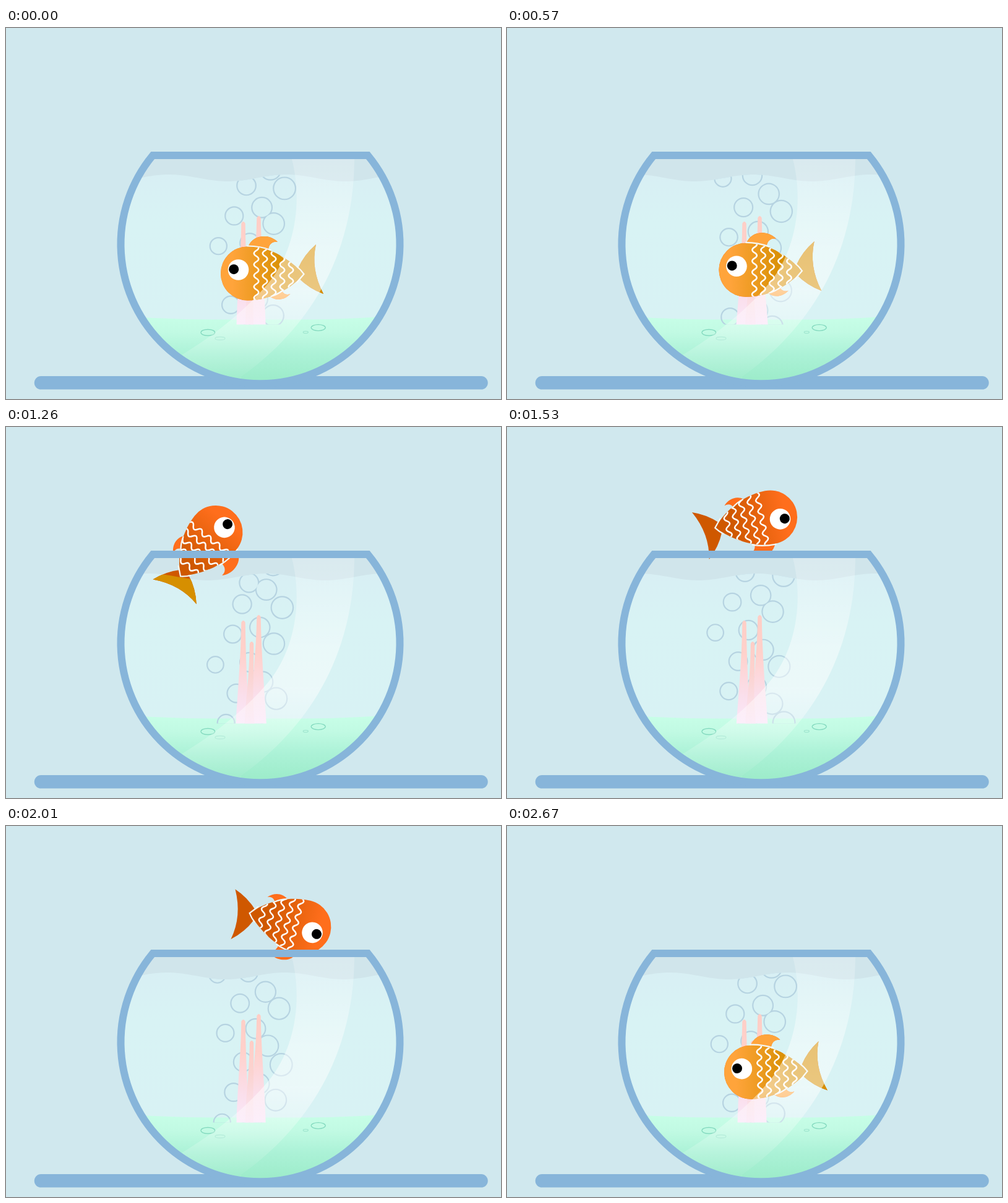
Animation, 800 px wide and 600 px high, one loop 2.7 s. Source, as an HTML page with a canvas:

```html
<!DOCTYPE html>
<html lang="en">
<head>
<meta charset="utf-8">
<title>Fish bowl</title>
<style>
  html, body { margin: 0; width: 100%; height: 100%; overflow: hidden; background: #d0e8ee; }
  canvas { display: block; width: 800px; height: 600px; }
</style>
</head>
<body>
<canvas id="stage" width="800" height="600"></canvas>
<script>
const g = document.getElementById('stage').getContext('2d');
const LOOP = 2700, STEP = 30, WATER_LOOP = 2670;
const TAU = Math.PI * 2;
const BLUE = '#87b5da';

// The fish circles this point; the turn eases through a few key angles
const PIVOT = { x: 420, y: 272 };
const TURN = [
  [0, 0], [570, 0.3], [1020, 61], [1080, 84], [1530, 168.5],
  [2010, 193.5], [2250, 224.5], [2670, 358.3], [2700, 360]
];
const BUBBLE_COUNT = 28, RISE = 0.192;

const shape = d => new Path2D(d);
const BOWL = shape('M237.2 206H584.8A225.5 225.5 0 1 1 237.2 206Z');
const TABLE = shape('M56.5 573.8H768');
const SAND = shape('M180 466Q300 473 410 473T640 465V600H180Z');
const GLARE = shape('M462 212C478 275 470 350 430 405C395 450 340 495 285 528L300 600H380V564C470 500 562 390 563 212Z');
const BODY = shape('M0-43.5C40-43.5 70-20 91 1C72 22 40 43.5 0 43.5A43.5 43.5 0 0 1 0-43.5Z');
const TOP_FIN = shape('M0-42C6-56 16-61 30-60C38-59 45-55 48.5-51C40-52 34-48 33-36Z');
const LOW_FIN = shape('M36 37C46 45 60 43 69 33C63 35 58 34 55 27Z');
const TAIL = shape('M110.5-47Q91-30 82-9L82 7Q100 25 122.5 33Q101.5-7 110.5-47Z');
const SEAMS = shape('M0-44.5Q20-44.5 37-38M38 37Q48 34 56 28M80-11Q86-6 91 1Q85 8 80 14');
const SCALES = new Path2D();
for (let x = 14; x <= 70; x += 14) {
  SCALES.addPath(shape(`M${x}-46` + 'q7.5 4.5 0 9q-7.5 4.5 0 9'.repeat(5)));
}

function fade(x0, y0, x1, y1, stops) {
  const f = g.createLinearGradient(x0, y0, x1, y1);
  stops.forEach(([p, c]) => f.addColorStop(p, c));
  return f;
}
const down = (y0, y1, stops) => fade(0, y0, 0, y1, stops);
const white = a => `rgba(255,255,255,${a})`;
const waterFill = down(232, 472, [[0, '#d8eff4'], [0.35, '#d8f3f4'], [0.995, '#d8f2f4'], [1, '#c7fde7']]);
const sandFill = down(468, 566, [[0, '#c7fee7'], [0.25, '#c1fae3'], [0.6, '#acf2d7'], [1, '#9eeccb']]);
const weedFill = down(304, 480, [[0, '#ffcec6'], [0.35, '#ffd1cb'], [0.75, '#fadfec'], [1, '#fae8f9']]);
const midWeedFill = down(346, 480, [[0, '#ffcdc5'], [0.4, '#fbd3d0'], [1, '#fae5f5']]);
const glareFill = down(212, 566, [
  [0, white(0.2)], [0.1, white(0.24)], [0.4, white(0.46)],
  [0.6, white(0.5)], [0.78, white(0.26)], [1, white(0.04)]
]);
const skin = (light, dark) => ({
  light, dark, body: fade(-25, 0, 62, 0, [[0, light], [1, dark]])
});
const DRY = skin('#ff6e1c', '#cf5800');
const WET = skin('#ffa43b', '#d68f00');

function fill(path, style) { g.fillStyle = style; g.fill(path); }
function stroke(path, style, width) {
  g.strokeStyle = style;
  g.lineWidth = width;
  g.stroke(path);
}
function disc(x, y, r, style) {
  const p = new Path2D();
  p.arc(x, y, r, 0, TAU);
  fill(p, style);
}
function clipped(path, draw) {
  g.save();
  g.clip(path);
  draw();
  g.restore();
}

const slope = i => (TURN[i + 1][1] - TURN[i][1]) / (TURN[i + 1][0] - TURN[i][0]);

// Tangent that never overshoots the key angles
function tangent(i) {
  if (i === 0 || i === TURN.length - 1) return 0;
  const h0 = TURN[i][0] - TURN[i - 1][0], h1 = TURN[i + 1][0] - TURN[i][0];
  const w0 = h0 + 2 * h1, w1 = 2 * h0 + h1;
  return (w0 + w1) / (w0 / slope(i - 1) + w1 / slope(i));
}

function turnAt(t) {
  let i = 0;
  while (TURN[i + 1][0] <= t) i++;
  const [t0, a] = TURN[i], [t1, b] = TURN[i + 1];
  const h = t1 - t0, u = (t - t0) / h, d = b - a;
  const m0 = h * tangent(i), m1 = h * tangent(i + 1);
  return a + u * (m0 + u * (3 * d - 2 * m0 - m1 + u * (m0 + m1 - 2 * d)));
}

function waterArea(sway) {
  const p = new Path2D();
  const crest = 430 + 32 * sway;
  p.moveTo(170, 600);
  for (let x = 170; x <= 650; x += 4) {
    p.lineTo(x, 242.5 - 5.5 * Math.cos((x - crest) * TAU / 190));
  }
  p.lineTo(650, 600);
  p.closePath();
  return p;
}

// Evenly released bubbles, spread sideways by the golden ratio
function drawBubbles(t) {
  const rims = new Path2D(), cores = new Path2D();
  const add = (p, x, y, r) => { p.moveTo(x + r, y); p.arc(x, y, r, 0, TAU); };
  for (let i = 0; i < BUBBLE_COUNT; i++) {
    const release = i * WATER_LOOP / BUBBLE_COUNT + 40 * Math.sin(i * 2.4);
    const age = (t - release + WATER_LOOP) % WATER_LOOP;
    const y = 505 - RISE * age;
    if (y < 200) continue;
    const spread = Math.pow((i * 0.618 + 0.7) % 1, 0.75);
    const x = 332 + 118 * spread + 3 * Math.sin(age / 220 + i);
    const r = 13 + 5 * spread;
    add(rims, x, y, r + 1.1);
    add(cores, x, y, r - 1.1);
  }
  fill(rims, '#b6d3e1');
  fill(cores, waterFill);
}

function drawSpike(x, top, left, right, sway, style) {
  const bend = 3 - 2 * sway;
  const l = left + 1.2 * sway, r = right - 1.2 * sway;
  const p = new Path2D();
  p.moveTo(l, 479.5);
  p.bezierCurveTo(l + bend, 420, x - 4, top + 60, x - 3.2, top + 3);
  p.quadraticCurveTo(x, top - 3, x + 3.2, top + 3);
  p.bezierCurveTo(x + 4, top + 60, r - bend, 420, r, 479.5);
  p.closePath();
  fill(p, style);
}

function drawOval(x, y, rx, ry, color) {
  const p = new Path2D();
  p.ellipse(x, y, rx, ry, 0, 0, TAU);
  stroke(p, color, 1.3);
}

function drawFish(t, look) {
  const drift = -Math.sin(TAU * t / LOOP);
  g.save();
  g.translate(PIVOT.x + 4 * drift, PIVOT.y + 5.7 * drift);
  g.rotate(turnAt(t) * Math.PI / 180);
  g.translate(-29.5, 125);
  fill(TAIL, look.dark);
  fill(TOP_FIN, look.light);
  fill(LOW_FIN, look.light);
  fill(BODY, look.body);
  clipped(BODY, () => stroke(SCALES, '#fff', 2.5));
  stroke(SEAMS, '#f3f8f6', 2.2);
  disc(-15, -6, 16.8, '#fff');
  disc(-22.3, -6.8, 8, '#000');
  g.restore();
}

function draw(t) {
  const wt = t % WATER_LOOP;
  const sway = Math.cos(TAU * (wt * 3 / WATER_LOOP - 0.12));
  const water = waterArea(sway);

  g.fillStyle = '#d0e8ee';
  g.fillRect(0, 0, 800, 600);

  g.lineCap = 'round';
  stroke(TABLE, BLUE, 21.5);

  clipped(BOWL, () => {
    g.fillStyle = '#d0e5eb';
    g.fillRect(170, 190, 480, 400);
    fill(water, waterFill);
    fill(SAND, sandFill);
    drawOval(326.3, 492.5, 11.3, 5, '#84dabf');
    drawOval(346, 502, 8, 2.5, '#a3e8d1');
    drawOval(504.7, 484.6, 11.5, 5, '#84dabf');
    drawOval(484.3, 492, 4, 1.7, '#a0e6cf');
    clipped(water, () => clipped(shape('M170 200H650V479.5H170Z'), () => drawBubbles(wt)));
    drawSpike(383.5, 313, 371.7, 393, sway, weedFill);
    drawSpike(408.5, 304, 394, 420.5, sway, weedFill);
    drawSpike(397, 347, 386, 401, sway, midWeedFill);
  });

  drawFish(t, DRY);
  clipped(water, () => drawFish(t, WET));

  clipped(BOWL, () => fill(GLARE, glareFill));
  stroke(BOWL, BLUE, 12);
}

const start = performance.now();
function tick() {
  const t = (performance.now() - start) % LOOP;
  draw(Math.floor(t / STEP) * STEP);
  requestAnimationFrame(tick);
}
tick();
</script>
</body>
</html>
```
